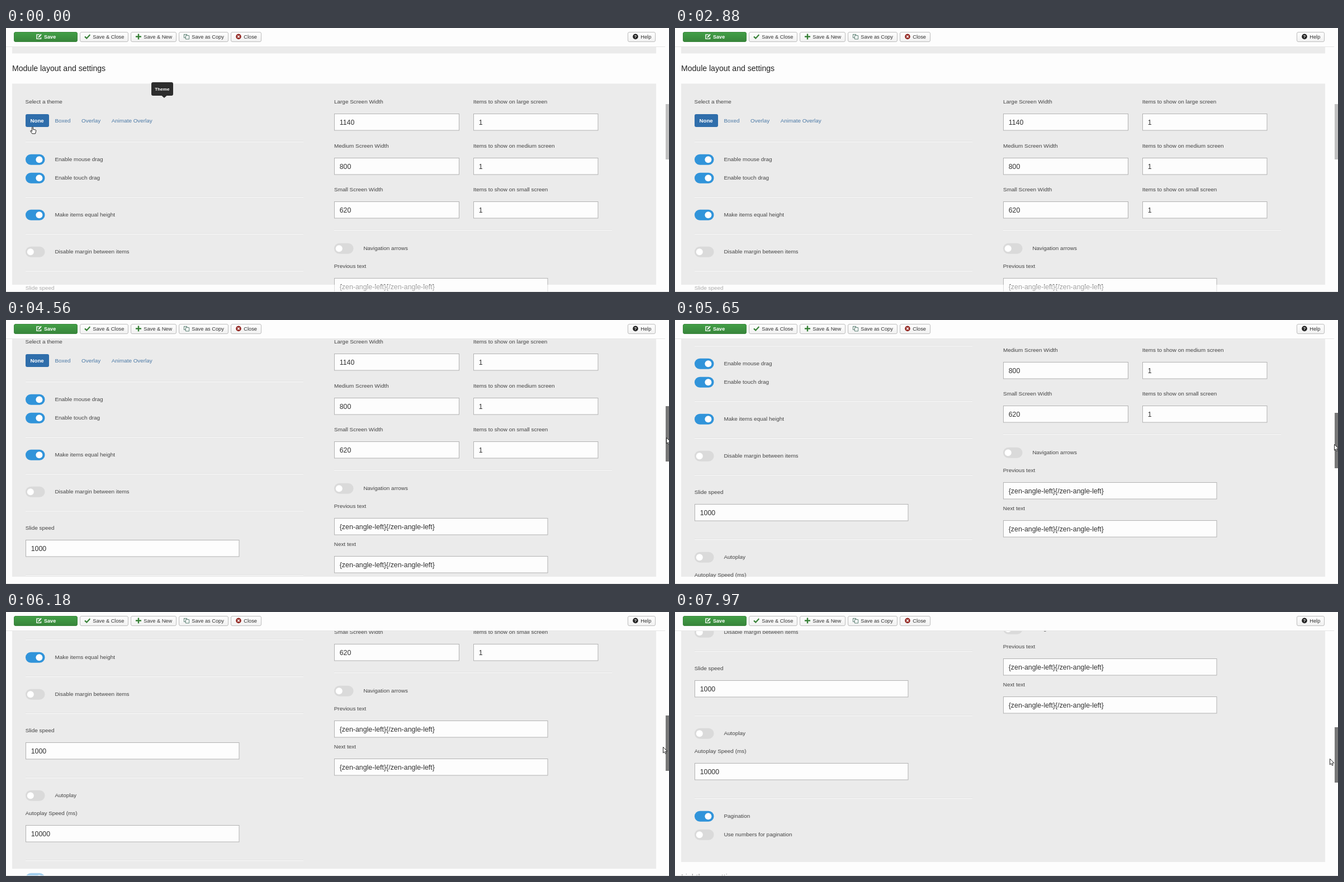
An HTML page with a canvas that plays this animation: 1186x472 px, repeating every 8 s.

```html
<!DOCTYPE html>
<html lang="en">
<head>
<meta charset="utf-8">
<title>Module settings</title>
<style>
html, body { margin: 0; width: 100%; height: 100%; overflow: hidden; background: #fdfdfd; }
canvas { display: block; width: 100vw; height: 100vh; }
</style>
</head>
<body>
<canvas id="stage" width="1186" height="472"></canvas>
<script>
const ctx = document.getElementById('stage').getContext('2d');
const W = 1186, H = 472, LOOP = 8000, TICK = 137.4;
const LEFT = 35, RIGHT = 587, ROW = 33;
const PAGE = '#fdfdfd', PANEL = '#ebebeb', INK = '#444', LINK = '#4b79a6', GREEN = '#378137';
const SANS = '"Liberation Sans", Arial, sans-serif';

// Each pull on the scrollbar: first tick, ticks, distance
const pulls = [[25, 5, 52], [31, 2, 41], [34, 2, 16], [39, 7, 168], [48, 2, 45], [56, 2, 42]];

const clamp = v => Math.min(1, Math.max(0, v));

function scrollAt(tick) {
  return Math.round(pulls.reduce((sum, [start, n, dist]) => sum + dist * clamp((tick - start) / n), 0));
}

function pointerAt(tick, offset) {
  if (tick <= 10) {
    const u = tick / 10;
    return [47 + 145 * u ** 3.6, 176 + 286 * u];
  }
  if (tick >= 16 && tick <= 20) {
    const u = (tick - 16) / 4;
    return [902 + 270 * u, 444 - 159 * u];
  }
  if (tick >= pulls[0][0]) return [1185 - offset * 0.038, 192 + offset / 5.2];
  return null;
}

function rect(x, y, w, h, fill) {
  ctx.fillStyle = fill;
  ctx.fillRect(x, y, w, h);
}

function stroke(color, width = 1) {
  ctx.strokeStyle = color;
  ctx.lineWidth = width;
  ctx.stroke();
}

function round(x, y, w, h, r, fill, border) {
  ctx.beginPath();
  ctx.roundRect(x, y, w, h, r);
  ctx.fillStyle = fill;
  ctx.fill();
  if (border) stroke(border);
}

function path(points, close) {
  ctx.beginPath();
  points.forEach(([x, y]) => ctx.lineTo(x, y));
  if (close) ctx.closePath();
}

function disc(x, y, r, fill) {
  ctx.beginPath();
  ctx.arc(x, y, r, 0, Math.PI * 2);
  ctx.fillStyle = fill;
  ctx.fill();
}

// y is the middle of the capitals
function text(str, x, y, size = 9.95, color = INK, weight = 'normal') {
  ctx.font = `${weight} ${size}px ${SANS}`;
  ctx.fillStyle = color;
  ctx.fillText(str, x, y + size * 0.36);
}

function rule(x, y) {
  rect(x, y, 497, 1, '#e2e2e2');
  rect(x, y + 1, 497, 1, '#fafafa');
}

function toggle(x, y, on, label) {
  round(x, y - 9.3, 34.5, 19, 9.5, on ? '#3194da' : '#dadada');
  disc(x + (on ? 24.4 : 8.8), y + 0.2, 6, '#fff');
  text(label, x + 52.4, y - 0.5);
}

function input(x, y, w, value) {
  rect(x, y, w, 30.5, '#b2b2b2');
  rect(x + 1, y + 1, w - 2, 28.5, PAGE);
  text(value, x + 9.7, y + 15.4, 12.4, '#333');
}

function field(x, y, label, value) {
  text(label, x - 0.3, y + 31.5);
  input(x, y + 53, 382.5, value);
}

function tabs() {
  text('Select a theme', 34.5, 131.5);
  round(LEFT, 154, 42, 23, 3, '#2f6eab');
  text('None', 43.5, 165.5, 9.7, '#fff', 'bold');
  let x = 87.5;
  for (const name of ['Boxed', 'Overlay', 'Animate Overlay']) {
    text(name, x, 165.5, 9.9, LINK);
    x += ctx.measureText(name).width + 19.6;
  }
}

function leftColumn() {
  let y = 202;
  const row = (on, label) => toggle(LEFT, y += ROW, on, label);
  const box = (label, value) => {
    field(LEFT, y, label, value);
    y += 82;
  };
  const split = () => rule(LEFT, y += ROW);

  tabs();
  rule(LEFT, y);
  row(true, 'Enable mouse drag');
  row(true, 'Enable touch drag');
  split();
  row(true, 'Make items equal height');
  split();
  row(false, 'Disable margin between items');
  split();
  box('Slide speed', '1000');
  split();
  row(false, 'Autoplay');
  box('Autoplay Speed (ms)', '10000');
  split();
  row(true, 'Pagination');
  row(false, 'Use numbers for pagination');
}

function rightColumn() {
  Object.entries({ Large: '1140', Medium: '800', Small: '620' }).forEach(([size, width], i) => {
    const y = 78.7 * i, top = 153 + Math.round(y);
    text(`${size} Screen Width`, RIGHT, 131.5 + y);
    text(`Items to show on ${size.toLowerCase()} screen`, 835.7, 131.5 + y);
    input(RIGHT, top, 224, width);
    input(836, top, 223.5, '1');
  });
  rule(RIGHT, 360);
  toggle(RIGHT, 394, false, 'Navigation arrows');
  ['Previous text', 'Next text'].forEach((label, i) =>
    field(RIGHT, 394 + 68 * i, label, '{zen-angle-left}{/zen-angle-left}'));
}

function clipped(height, offset, paint) {
  ctx.save();
  ctx.beginPath();
  ctx.rect(0, 34, W, height);
  ctx.clip();
  ctx.translate(0, -offset);
  paint();
  ctx.restore();
}

function page(offset) {
  clipped(425, offset, () => {
    rect(11, 0, 1152, 45.5, PANEL);
    rect(11, 99.5, 1152, 711.5, PANEL);
  });
  clipped(437, offset, () => {
    text('Module layout and settings', 11, 72.3, 14.05, '#222');
    text('Lightbox settings', 11, 838, 14.05, '#222');
    leftColumn();
    rightColumn();
  });
  rect(0, 459, 1179, 12, 'rgba(253,253,253,0.56)');
  rect(0, 471, W, 1, '#dedede');
}

// Icons are drawn around their own centre
const icons = {
  edit() {
    path([[1, -3.5], [-4, -3.5], [-4, 4], [3.5, 4], [3.5, 1]]);
    stroke('#fff', 1.4);
    path([[-1, 1.5], [4, -4]]);
    stroke('#fff', 2);
  },
  check() {
    path([[-5, 0], [-1.7, 3], [4.3, -3.3]]);
    stroke(GREEN, 2.2);
  },
  plus() {
    rect(-5, -1.2, 10, 2.4, GREEN);
    rect(-1.2, -5, 2.4, 10, GREEN);
  },
  copy() {
    ctx.strokeStyle = '#5b7f73';
    ctx.lineWidth = 1;
    ctx.strokeRect(-4.5, -4, 5, 6);
    round(-1.5, -2, 6, 6.5, 0, '#fff', '#5b7f73');
  },
  cross() {
    disc(0, 0, 4.8, '#942a25');
    for (const s of [-1.8, 1.8]) {
      path([[-s, -1.8], [s, 1.8]]);
      stroke('#fff', 1.4);
    }
  },
  help() {
    disc(0, 0, 4.8, '#222');
    text('?', -2.4, 0.1, 8, '#fff', 'bold');
  }
};

function button(x, w, top, bottom, border) {
  const fill = ctx.createLinearGradient(0, 7, 0, 25);
  fill.addColorStop(0, top);
  fill.addColorStop(1, bottom);
  round(x + 0.5, 7.5, w - 1, 17, 2.5, fill, border);
}

function icon(name, x) {
  ctx.save();
  ctx.translate(x, 15.4);
  icons[name]();
  ctx.restore();
}

// Returns the x at which the next button starts
function plainButton(x, name, label) {
  ctx.font = `9.25px ${SANS}`;
  const w = Math.round(ctx.measureText(label).width + 31);
  button(x, w, '#ffffff', '#f0f0f0', '#bdbdbd');
  icon(name, x + 14);
  text(label, x + 23.3, 15.8, 9.25, '#333');
  return x + w + 4;
}

function toolbar() {
  rect(0, 0, W, 33, PAGE);
  rect(0, 33, 1179, 1, '#e6e6e6');
  button(14, 114, '#43a047', '#37843a', '#3b873d');
  icon('edit', 59);
  text('Save', 68, 15.8, 9.1, '#fff', 'bold');
  let x = 132;
  x = plainButton(x, 'check', 'Save & Close');
  x = plainButton(x, 'plus', 'Save & New');
  x = plainButton(x, 'copy', 'Save as Copy');
  plainButton(x, 'cross', 'Close');
  plainButton(1112, 'help', 'Help');
}

function tooltip() {
  round(260, 97, 39, 24, 3, '#2d2d2d');
  path([[278.5, 121], [287.5, 121], [283, 125]], true);
  ctx.fill();
  text('Theme', 266.3, 108.8, 8.1, '#fff', 'bold');
}

const ARROW = [[0, 0], [0, 10.5], [2.4, 8.3], [4, 12], [5.8, 11.2], [4.2, 7.6], [7.5, 7.4]];
const HAND = [[-1, 1], [0, 0.4], [1, 1], [1, 4.8], [5.4, 5.6], [6.4, 6.6], [5, 12.4],
  [-0.6, 12.4], [-3.8, 8], [-3.4, 6.8], [-1, 8.4]];

function cursor(x, y, shape) {
  ctx.save();
  ctx.translate(Math.round(x) + 0.5, Math.round(y) + 0.5);
  path(shape, true);
  ctx.lineJoin = 'round';
  ctx.fillStyle = '#fff';
  ctx.fill();
  stroke('#222');
  ctx.restore();
}

function draw(t) {
  const tick = Math.floor(t / TICK + 0.3);
  const offset = scrollAt(tick);
  const held = tick >= pulls[0][0];
  rect(0, 0, W, H, PAGE);
  page(offset);
  toolbar();
  rect(1180, 136 + Math.round(offset / 5.2), 6, 99, held ? '#787878' : '#c1c1c1');
  if (tick === 0) tooltip();
  const at = pointerAt(tick, offset);
  if (at) cursor(...at, tick === 0 ? HAND : ARROW);
}

function frame() {
  draw(performance.now() % LOOP);
  requestAnimationFrame(frame);
}
frame();
</script>
</body>
</html>
```
